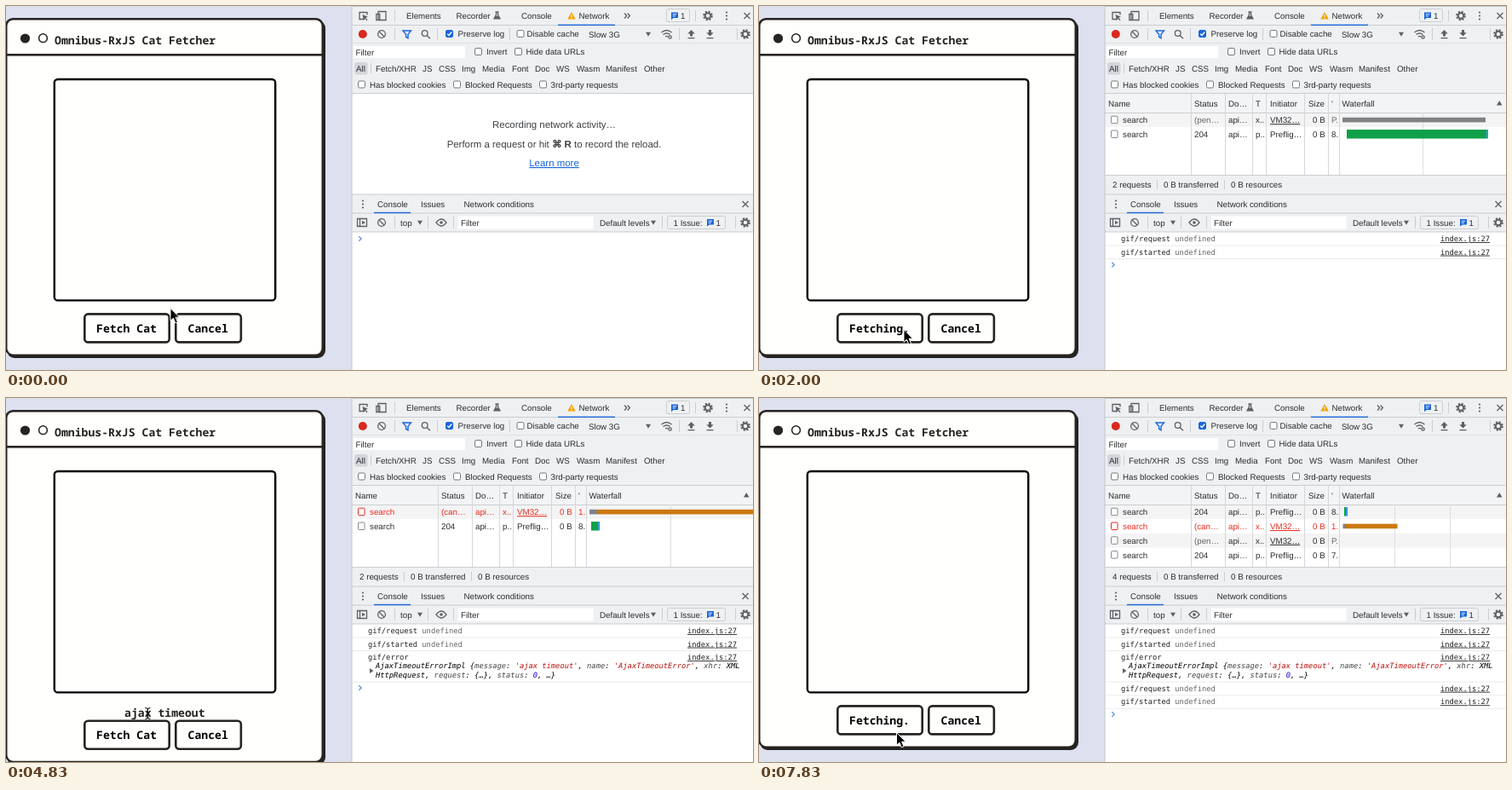
These frames come from a looping animation (877x427 px, 8000 ms). An HTML page:

```html
<!DOCTYPE html>
<html lang="en">
<head>
<meta charset="utf-8">
<title>Cat Fetcher</title>
<style>
  html, body { margin: 0; width: 100%; height: 100%; overflow: hidden; background: #fff; }
  svg { display: block; width: 877px; height: 427px; }
  text { white-space: pre; text-rendering: geometricPrecision; }
  .ui { font: 9.75px "Liberation Sans", Arial, sans-serif; fill: #2b2d30; }
  .app { font: 600 13.15px "Noto Sans Mono", "DejaVu Sans Mono", monospace; fill: #24211f; }
  .bold { font-weight: 700; fill: #000; }
  .log { font: 8.78px "DejaVu Sans Mono", monospace; fill: #222; }
  .em { font-style: italic; fill: #000; }
  .dim { fill: #666; }
  .key { fill: #444; }
  .red { fill: #e8291c; }
  .str { fill: #b8100a; }
  .num { fill: #1c00cf; }
  .link { text-decoration: underline; }
  .big { font-size: 11.45px; fill: #3c3f42; text-anchor: middle; }
  .icon { fill: none; stroke: #5c6064; stroke-width: 1.3; }
  .solid { fill: #5c6064; }
</style>
</head>
<body>
<svg id="stage" viewBox="0 0 877 427" xmlns="http://www.w3.org/2000/svg"></svg>
<script>
const INK = '#262320', BLUE = '#1a66d8', BAR = '#eef0f2', RULE = '#cbced2';

const text = (x, y, s, cls = 'ui', extra = '') => `<text x="${x}" y="${y}" class="${cls}" ${extra}>${s}</text>`;
const rect = (x, y, w, h, fill, extra = '') => `<rect x="${x}" y="${y}" width="${w}" height="${h}" fill="${fill}" ${extra}/>`;
const circle = (x, y, r, extra) => `<circle cx="${x}" cy="${y}" r="${r}" ${extra}/>`;
const path = (d, extra = 'class="icon"') => `<path d="${d}" ${extra}/>`;
const group = (id, body) => `<g id="${id}">${body}</g>`;
const outline = (x, y, w, h, color, width, r) =>
  rect(x, y, w, h, '#fffffe', `stroke="${color}" stroke-width="${width}" rx="${r}"`);
const vline = (x, y, h, color = RULE) => rect(x, y, 1, h, color);
const hline = (y, color = RULE) => rect(406, y, 471, 1, color);

// Toolbar icons
const gear = (x, y) => circle(x, y, 4.8, 'class="icon" stroke-dasharray="2.2 1.57" style="stroke-width:2"') +
  circle(x, y, 3.2, 'class="icon" style="stroke-width:1.9"');
const block = (x, y) => circle(x, y, 4.4, 'class="icon"') + path(`M${x - 3} ${y - 3}l6 6`);
const dots = (x, y) => [-4, 0, 4].map(d => circle(x, y + d, 1.1, 'class="solid"')).join('');
const cross = (x, y) => path(`M${x - 3.5} ${y - 3.5}l7 7m0-7l-7 7`);
const triangle = (x, y) => path(`M${x - 3} ${y - 2.3}h6l-3 5z`, 'class="solid"');
const bubble = (x, y) => path(`M${x} ${y}h8v6.5h-5.5l-2.5 2.3z`, `fill="${BLUE}"`) +
  path(`M${x + 1.7} ${y + 2.2}h4.6m-4.6 2.1h3.2`, 'stroke="#fff" stroke-width=".9"');
const check = (x, y, labelX, label, on) =>
  rect(x + .5, y + .5, 8, 8, on ? BLUE : '#fff', `rx="1.5" stroke="${on ? BLUE : '#77797c'}"`) +
  (on ? path(`M${x + 2.2} ${y + 4.7}l1.8 1.8 3.2-4`, 'fill="none" stroke="#fff" stroke-width="1.4"') : '') +
  text(labelX, y + 8, label);

function appWindow() {
  return rect(0, 0, 406, 427, '#dce0ef') +
    group('frame', '') +
    rect(0, 56, 371, 2.6, INK) +
    circle(22.5, 38, 5.6, `fill="${INK}"`) +
    circle(43.5, 37.7, 4.9, `fill="none" stroke="${INK}" stroke-width="1.5"`) +
    text(57, 45, 'Omnibus-RxJS Cat Fetcher', 'app') +
    outline(56.8, 86, 259.4, 259.4, '#000', 2.4, 4) +
    group('message', text(139, 373.5, 'ajax timeout', 'app')) +
    group('buttons',
      outline(92.3, 361.4, 99.4, 33, INK, 2.6, 4) + outline(199.3, 361.4, 76.6, 33, INK, 2.6, 4) +
      '<text id="fetch" x="106" y="382.5" class="app bold"></text>' +
      text(213.5, 382.5, 'Cancel', 'app bold'));
}

// Drop shadow, border, then the white face.
function windowFrame(shift) {
  const h = 394 + shift;
  return rect(1, 17, 374, h + 2, INK, 'rx="9"') + rect(-1, 14, 374, h + 2, INK, 'rx="9"') +
    rect(1.5, 16.5, 369, h - 2, '#fffffe', 'rx="7"');
}

function networkToolbar() {
  const types = { 'Fetch/XHR': 434, JS: 489, CSS: 508, Img: 535, Media: 559, Font: 594, Doc: 621,
    WS: 646, Wasm: 670, Manifest: 704, Other: 749 };
  return rect(406, 0, 471, 103, BAR) + hline(0, '#c4c6ca') + hline(22) + hline(43, '#dfe1e4') + hline(102) +
    path('M421 15.5h-6v-8h9v3') + path('M418.5 10l6.5 2.7-2.8 1 2.3 2.6-1 .9-2.3-2.6-1.4 2.3z', 'class="solid"') +
    path('M437 16.5v-10h9v10zM434.8 9.5h4v7h-4z', `class="icon" style="fill:${BAR}"`) + vline(456, 5, 13) +
    text(470, 15, 'Elements') + text(528.5, 15, 'Recorder') +
    path('M574.5 7h4m-3 0v3.3l-2.4 4.5h6.8l-2.4-4.5V7') + path('M574.5 11.8h4l2 3.3h-8z', 'class="solid"') +
    text(605, 15, 'Console') + path('M664 7l4.8 8.6h-9.6z', 'fill="#f2a600"') +
    path('M664 10v3m0 .8v1', 'stroke="#fff" stroke-width="1"') +
    text(672.5, 15, 'Network') + rect(648, 21.6, 67, 1.4, BLUE) +
    path('M726 8.5l2.7 3-2.7 3m3.7-6l2.7 3-2.7 3') +
    rect(775.5, 3.5, 27, 15, 'none', `rx="2" stroke="${RULE}"`) + bubble(781, 7.5) + text(792, 15, '1') +
    vline(809, 5, 13) + gear(824, 11.5) + dots(846, 11.5) + cross(870, 11.5) +

    circle(418.8, 33, 5, 'fill="#d9281e"') + block(441, 33) + vline(456, 26, 14) +
    path('M466 29h9.5l-3.5 4.3v4.4l-2.4-1.3v-3.1z', `fill="none" stroke="${BLUE}" stroke-width="1.4"`) +
    circle(491.7, 32, 3.4, 'class="icon"') + path('M494.2 34.5l3.8 3.8') + vline(506, 26, 14) +
    check(516, 28, 530.5, 'Preserve log', true) + vline(591, 26, 14) + check(599.5, 28, 611.5, 'Disable cache') +
    text(684, 36.5, 'Slow 3G') + triangle(754, 33) +
    path('M769.5 31q6-5 12 0m-10 2.5q4-3 8 0m-5.5 2.5q1.5-1.2 3 0') +
    circle(779.5, 36.5, 1.7, 'class="icon"') +
    vline(790, 26, 14) + path('M804.5 28l4.2 4.4h-2.7v3.2h-3v-3.2h-2.7zM800.5 37h8v1.3h-8z', 'class="solid"') +
    path('M826.5 35.6l-4.2-4.4h2.7v-3.2h3v3.2h2.7zM822.5 37h8v1.3h-8z', 'class="solid"') +
    vline(858, 26, 14) + gear(868, 33) +

    rect(408, 47, 131, 14, '#fff') + text(410.5, 58, 'Filter') +
    check(550, 49, 564, 'Invert') + check(597, 49, 610.5, 'Hide data URLs') +
    rect(409, 66, 15.5, 14.5, '#d3d6da', 'rx="3"') + text(411, 76.8, 'All') + vline(428, 67, 12) +
    Object.entries(types).map(([label, x]) => text(x, 76.8, label)).join('') +
    check(413, 87.5, 427, 'Has blocked cookies') + check(525, 87.5, 539, 'Blocked Requests') +
    check(626, 87.5, 639.5, '3rd-party requests');
}

function emptyNetwork() {
  return text(643.5, 143, 'Recording network activity…', 'ui big') +
    text(643.5, 165.5, 'Perform a request or hit <tspan font-weight="700">⌘ R</tspan> to record the reload.', 'ui big') +
    text(643.5, 188, 'Learn more', 'ui big link', `style="fill:${BLUE}"`);
}

const ROWS = {
  preflight: { status: '204', type: 'p..', initiator: 'Preflig…' },
  pending: { status: '(pen…', type: 'x..', initiator: 'VM32…', time: 'P.' },
  canceled: { status: '(can…', type: 'x..', initiator: 'VM32…', time: '1.' },
};

function requestRow(kind, time, i) {
  const row = ROWS[kind], y = 137.2 + i * 16.8;
  const red = kind === 'canceled' ? ' red' : '';
  const cell = (x, s, extra = '') => text(x, y, s, 'ui' + red + extra);
  return (i % 2 ? '' : rect(406, y - 12, 471, 16.8, '#f4f4f5')) +
    rect(413.5, y - 8, 7.5, 8.5, '#fff', `rx="1" stroke="${red ? '#e8291c' : '#85888c'}"`) +
    cell(427, 'search') + cell(511, row.status, kind === 'pending' ? ' dim' : '') + cell(551, 'api…') +
    cell(583, row.type) + cell(600, row.initiator, kind === 'preflight' ? '' : ' link') +
    cell(650, '0 B') + cell(672, row.time || time, kind === 'pending' ? ' dim' : '');
}

function requestTable(rows, gridlines, bars) {
  const heads = { Name: 410, Status: 511, 'Do…': 551, T: 583, Initiator: 600, Size: 645, "'": 672, Waterfall: 684.5 };
  return rows.map(([kind, time], i) => requestRow(kind, time, i)).join('') +
    rect(406, 103, 471, 22, '#f3f4f5') + hline(125) +
    Object.entries(heads).map(([label, x]) => text(x, 117.5, label)).join('') +
    path('M866 116.5h6.5l-3.2-5.6z', 'class="solid"') +
    [507, 547, 579, 595, 640, 668, 681].map(x => vline(x, 103, 95, '#d4d6d9')).join('') +
    gridlines.map(x => vline(x, 125, 73, '#dcdee0')).join('') + bars +
    hline(198) + rect(406, 199, 471, 22, BAR) +
    text(415, 213, rows.length + ' requests') + vline(467, 204, 11) +
    text(475, 213, '0 B transferred') + vline(546, 204, 11) + text(554, 213, '0 B resources');
}

const thin = (x, end, y, color) => rect(x, y, end - x, 5.6, color);
const thick = (x, end, y) => rect(x, y, end - x - 1.8, 10.5, '#10a04a') + rect(end - 1.8, y, 1.8, 10.5, '#2090d8');
const GRAY = '#808284', ORANGE = '#cb780f';

function drawer() {
  return rect(406, 221, 471, 44, BAR) + hline(220.5) + hline(242.5) + hline(264.5) +
    dots(419, 232.5) + text(436, 236, 'Console') + rect(432, 241.8, 43, 1.4, BLUE) +
    text(487, 236, 'Issues') + text(537.5, 236, 'Network conditions') + cross(868, 232.5) +
    path('M412.5 249.5h11v9h-11zm3 0v9') + path('M418 251.7l4 2.3-4 2.3z', 'class="solid"') +
    block(441, 254) + vline(456, 247, 14) + text(463, 257.5, 'top') + triangle(486, 254) + vline(495, 247, 14) +
    path('M505 254q6-8 12 0q-6 8-12 0z') + circle(511, 254, 1.8, 'class="solid"') + vline(525, 247, 14) +
    rect(531, 246.5, 158.5, 15, '#fff') + text(534, 257.5, 'Filter') +
    text(697, 257.5, 'Default levels') + triangle(760, 254) + vline(770, 247, 14) +
    rect(776.5, 246.5, 68, 15, 'none', `rx="2" stroke="${RULE}"`) + text(783.5, 257.5, '1 Issue:') +
    bubble(823, 250) + text(833.5, 257.5, '1') + vline(856, 247, 14) + gear(868, 254);
}

const prompt = y => path(`M414.3 ${y - 2.7}l2.8 2.7-2.8 2.7`, 'fill="none" stroke="#5b93e6" stroke-width="1.3"');
const source = y => text(800, y, 'index.js:27', 'log link');
const logPair = y =>
  ['request', 'started'].map((name, i) => {
    const base = y + i * 15.6;
    return text(425, base, `gif/${name} <tspan class="dim">undefined</tspan>`, 'log') +
      source(base) + hline(base + 4.5, '#ebebeb');
  }).join('');

function errorLog() {
  const span = (cls, s) => `<tspan class="${cls}">${s}</tspan>`;
  return text(425, 307, 'gif/error', 'log') + source(307) + path('M427 317l4.5 3-4.5 3z', 'class="solid"') +
    text(434, 317, `AjaxTimeoutErrorImpl {${span('key', 'message')}: ${span('str', "'ajax timeout'")}, ` +
      `${span('key', 'name')}: ${span('str', "'AjaxTimeoutError'")}, ${span('key', 'xhr')}: XML`, 'log em') +
    text(434, 328, `HttpRequest, ${span('key', 'request')}: {…}, ${span('key', 'status')}: ${span('num', '0')}, …}`, 'log em') +
    hline(332.5, '#ebebeb');
}

function pointers() {
  return group('ring', circle(0, 0, 21.3, 'fill="none" stroke="#111" stroke-width="1.7"')) +
    group('arrow', path('M0-.5V14.3L3.4 11.2 5.9 16.9 8.5 15.8 6.1 10.2H10.6Z', 'stroke="#fff" stroke-width="1" stroke-linejoin="round"')) +
    group('beam', path('M-3-6.5q3 0 3 2.5v8q0 2.5-3 2.5M3-6.5q-3 0-3 2.5v8q0 2.5 3 2.5M-2 1.5h4', 'fill="none" stroke="#111" stroke-width="1.2"'));
}

const VIEWS = {
  idle: emptyNetwork() + prompt(273),
  pending: requestTable([['pending'], ['preflight', '8.']], [779],
    thin(685, 853, 130.8, GRAY) + thick(690, 856, 145)) + logPair(276) + prompt(303.5),
  failed: requestTable([['canceled'], ['preflight', '8.']], [780],
    thin(685, 694, 130.8, GRAY) + thin(694, 877, 130.8, ORANGE) + thick(687, 697, 145)) +
    logPair(276) + errorLog() + prompt(340),
  retry: requestTable([['preflight', '8.'], ['canceled'], ['pending'], ['preflight', '7.']], [746, 811],
    thick(687, 691, 128) + thin(685.5, 688, 147.6, GRAY) + thin(688, 749.5, 147.6, ORANGE)) +
    logPair(276) + errorLog() + logPair(343.7) + prompt(371),
};

const stage = document.getElementById('stage');
stage.innerHTML = appWindow() + rect(406, 0, 471, 427, '#fff') + networkToolbar() +
  Object.entries(VIEWS).map(([id, body]) => group(id, body)).join('') +
  drawer() + vline(405.5, 0, 427, '#c4c6ca') + pointers();

const el = id => document.getElementById(id);
const show = (id, on) => el(id).setAttribute('display', on ? 'inline' : 'none');
const move = (id, x, y) => el(id).setAttribute('transform', `translate(${x} ${y})`);

// Pointer route: time in ms, x, y
const ROUTE = [[0, 193, 355], [170, 193, 355], [1170, 170, 380], [3500, 170, 380], [4330, 152, 370],
  [4600, 152, 370], [5400, 222, 370], [6170, 209, 370], [7170, 161.5, 393], [8000, 161.5, 393]];

function pointerAt(time) {
  const i = ROUTE.findIndex(p => p[0] > time);
  const [a, b] = [ROUTE[i - 1], ROUTE[i]];
  const u = (time - a[0]) / (b[0] - a[0]), ease = u * u * (3 - 2 * u);
  return [a[1] + (b[1] - a[1]) * ease, a[2] + (b[2] - a[2]) * ease];
}

const LOOP = 8000, TICK = LOOP / 48;

function draw(now) {
  const tick = Math.floor(((now % LOOP) + 5) / TICK) % 48;
  const view = tick < 9 ? 'idle' : tick < 15 ? 'pending' : tick < 47 ? 'failed' : 'retry';
  const failed = view === 'failed', shift = failed ? 17.3 : 0;
  Object.keys(VIEWS).forEach(id => show(id, id === view));
  el('frame').innerHTML = windowFrame(shift);
  el('fetch').textContent = view === 'idle' || failed ? 'Fetch Cat' : 'Fetching.';
  show('message', failed);
  move('buttons', 0, shift);

  const [x, y] = pointerAt(tick * TICK);
  const overText = failed && y < 377 && x > 138 && x < 235;
  show('ring', tick === 8 || tick === 46);
  show('arrow', !overText);
  show('beam', overText);
  ['ring', 'arrow', 'beam'].forEach(id => move(id, x, y));
}

const start = performance.now();
function loop() {
  draw(performance.now() - start);
  requestAnimationFrame(loop);
}
loop();
</script>
</body>
</html>
```
